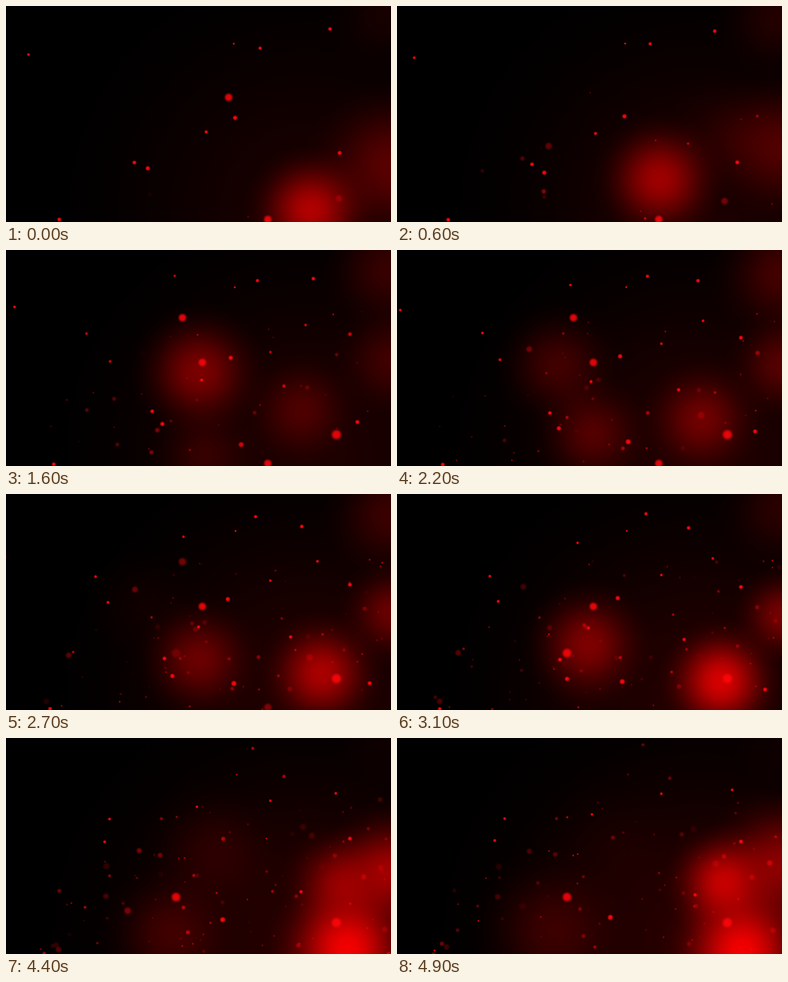
An HTML page with a canvas for the animation above (5 s loop, 600 by 338 pixels).

```html
<!DOCTYPE html>
<html lang="en">
<head>
<meta charset="utf-8">
<title>Red embers</title>
<style>
html, body { margin: 0; width: 100%; height: 100%; overflow: hidden; background: #000; }
canvas { display: block; width: 100vw; height: 100vh; }
</style>
</head>
<body>
<canvas id="stage" width="600" height="338"></canvas>
<script>
const ctx = document.getElementById('stage').getContext('2d');
const LOOP = 5000, STEP = 100;

// Drifting haze, key points: [time, x, y, radius, strength]
const haze = {
  sweep: [[0,475,320,105,.66], [1.6,300,190,110,.45], [2.8,200,170,100,0]],
  core: [[0,548,170,100,0], [1.6,460,250,95,.22], [2.2,475,265,100,.36], [3.1,505,293,100,.82], [3.8,524,325,125,.95], [4.9,538,332,125,.95]],
  rise: [[1.2,310,345,90,.06], [3.1,297,235,105,.45], [3.8,310,185,115,.2], [4.9,330,170,120,.03]],
  low: [[3,285,300,100,0], [3.8,275,310,100,.22], [4.9,240,300,130,.18]],
  edge: [[0,602,250,140,.3], [1.6,602,170,100,.2], [3.1,602,190,85,.42], [3.8,602,220,95,.68], [4.9,600,200,130,.5]],
  pillar: [[3.5,540,225,90,0], [4.9,507,225,95,.72]],
  top: [[0,590,10,100,.08], [2.4,600,40,120,.26], [3.8,600,0,100,.04]]
};

// Steady sparks on straight paths: [x, y, vx, vy, radius], place at time 0
const early = [
  [505,36,-16.3,5.5,2.7], [396,66,-2.6,-11.3,2.4], [35,76,-13.6,8.2,2], [355,59,1,-.4,1.3],
  [357,175,-4.2,-3.9,3.2], [312,197,-4.4,4.1,2.3], [200,245,17.4,4.6,2.8], [221,254,14.2,11.4,3.2],
  [83,334,-5.3,.8,2.8], [520,230,17.3,24.5,3]
];
const late = [
  [167,181,-3,-4.2,2.1], [418,197,9.5,9.9,2.5], [383,316,-10.3,-7.2,3.8], [412,195,0,-22,1.9],
  [536,117,0,9.2,2.9], [105,133,12.8,-1.4,2], [243,2,12.4,24,1.8], [440,135,16.8,-11,2]
];

// Large lights: [x, y, radius, from, to]
const orbs = [
  [347,143,6,-1,.2], [275,106,6,1.5,2.5], [306,176,6,1.4,3.4],
  [515,289,7.5,1.6,5], [265,249,7,3,5.2], [408,334,6,-1,2.5]
];

let seed = 41;
const rand = () => (seed = seed * 16807 % 2147483647) / 2147483647;
const mix = (a, b, p) => a + (b - a) * p;
const ramp = (t, a, b) => Math.min(1, Math.max(0, (t - a) / (b - a)));

// Embers gather below a rising diagonal and grow more frequent with time
const embers = Array.from({ length: 190 }, () => {
  const x = mix(60, 590, rand());
  const top = Math.max(95, 300 - x * .75);
  const size = rand() ** 3;
  return {
    x, y: mix(top, 335, rand()),
    vx: mix(-14, 14, rand()), vy: mix(-16, 8, rand()),
    r: 1.1 + 4.6 * size,
    a: mix(.25, .85, rand()) * (1 - .45 * size),
    peak: 5.3 * Math.sqrt(rand()),
    span: mix(.5, 1.2, rand())
  };
});

function glow(x, y, r, a) {
  const g = ctx.createRadialGradient(x, y, 0, x, y, r);
  for (let d = 0; d <= 1; d += .125) {
    g.addColorStop(d, `rgba(255,0,0,${a * Math.exp(-3 * d * d) * (1 - d ** 4)})`);
  }
  ctx.fillStyle = g;
  ctx.fillRect(x - r, y - r, 2 * r, 2 * r);
}

function dot(x, y, r, a) {
  const R = r * 1.2 + .4;
  const g = ctx.createRadialGradient(x, y, 0, x, y, R);
  const tone = k => `rgba(255,6,10,${a * k})`;
  g.addColorStop(0, tone(1));
  g.addColorStop(.5, tone(.9));
  g.addColorStop(1, tone(0));
  ctx.fillStyle = g;
  ctx.fillRect(x - R, y - R, 2 * R, 2 * R);
}

function drawHaze(keys, t) {
  const i = keys.findIndex(k => k[0] > t);
  if (i === 0) return;
  const to = i < 0 ? keys[keys.length - 1] : keys[i];
  const from = i < 0 ? to : keys[i - 1];
  const p = ramp(t, from[0], to[0] + 1e-6);
  glow(...[1, 2, 3, 4].map(n => mix(from[n], to[n], p)));
}

function drawSparks(list, t, alpha) {
  for (const [x, y, vx, vy, r] of list) dot(x + vx * t, y + vy * t, r, alpha);
}

function drawEmber({ x, y, vx, vy, r, a, peak, span }, t) {
  const d = t - peak;
  if (Math.abs(d) < span) dot(x + vx * d, y + vy * d, r, a * (1 - (d / span) ** 2));
}

function drawOrb([x, y, r, from, to], t) {
  const a = Math.min(ramp(t, from - .4, from), 1 - ramp(t, to, to + .4));
  if (a > 0) dot(x, y, r, .9 * a);
}

function draw(t) {
  ctx.globalCompositeOperation = 'source-over';
  ctx.fillStyle = '#000';
  ctx.fillRect(0, 0, 600, 338);
  ctx.globalCompositeOperation = 'screen';
  glow(470, 320, 440, .1 + .012 * t);
  Object.values(haze).forEach(keys => drawHaze(keys, t));
  ctx.globalCompositeOperation = 'source-over';
  embers.forEach(e => drawEmber(e, t));
  orbs.forEach(o => drawOrb(o, t));
  drawSparks(early, t, 1 - .6 * ramp(t, 3.8, 4.9));
  drawSparks(late, t, ramp(t, .8, 1.8));
}

const start = performance.now();
function frame() {
  const ms = (performance.now() - start) % LOOP;
  draw(Math.floor(ms / STEP) * STEP / 1000);
  requestAnimationFrame(frame);
}
frame();
</script>
</body>
</html>
```
